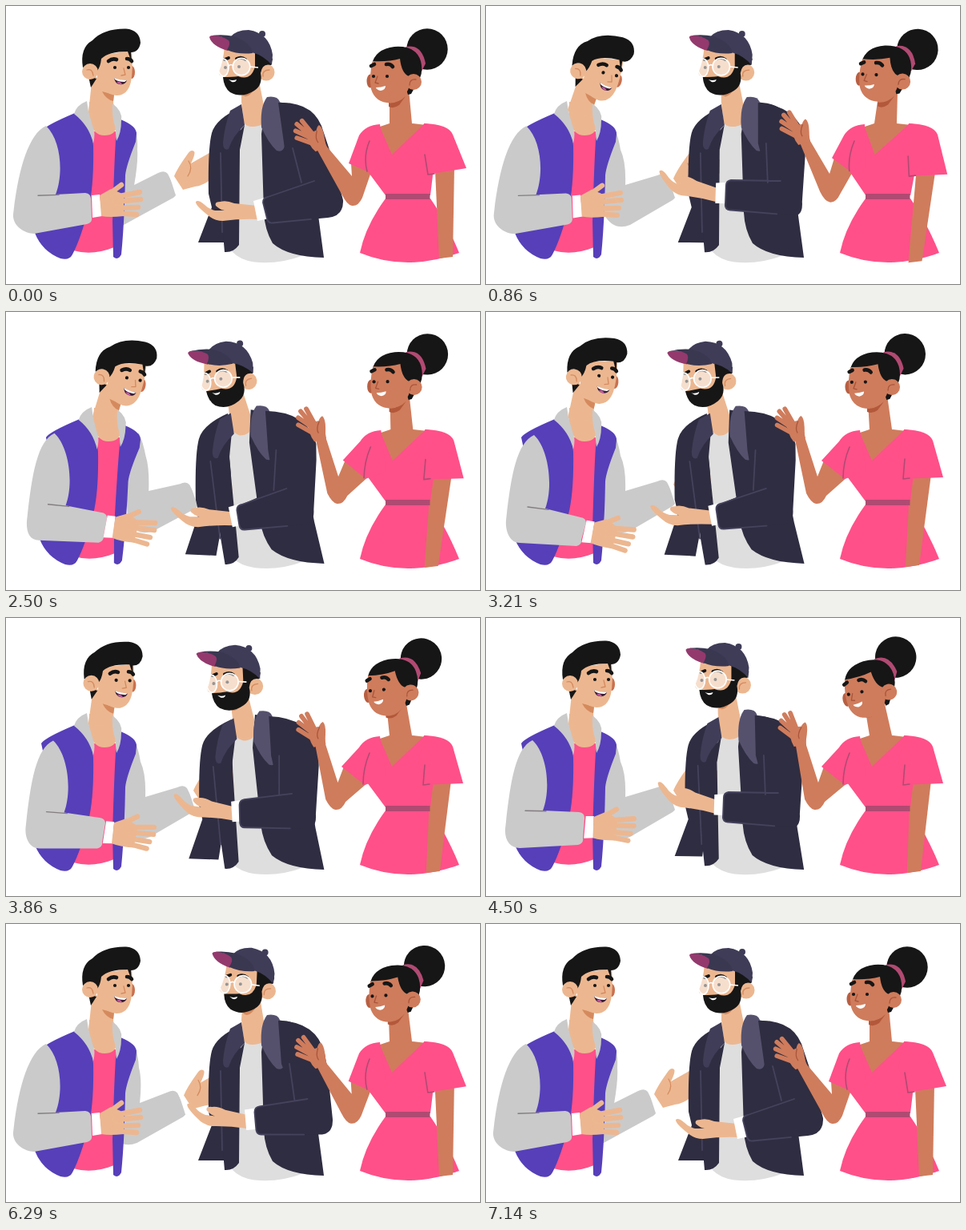
Write an HTML page that moves like this. It is 592 px wide and 348 px high and loops after 7210 ms.

```html
<!DOCTYPE html>
<html lang="en">
<head>
<meta charset="utf-8">
<title>Three friends</title>
<style>
html, body { margin: 0; width: 100%; height: 100%; overflow: hidden; background: #fff; }
svg { display: block; width: 100%; height: 100%; }
.grey { fill: #cacaca; } .violet { fill: #563fb9; } .pink { fill: #ff5089; }
.skin { fill: #ecb790; } .shade { fill: #d58a5e; } .tan { fill: #cf7c5c; } .tanShade { fill: #b3583a; }
.ink { fill: #161616; } .coat { fill: #2f2d41; } .white { fill: #fff; }
.line { fill: none; stroke-width: 1.3; stroke-linecap: round; stroke-linejoin: round; }
.brow { fill: none; stroke: #161616; stroke-width: 4.6; stroke-linecap: round; }
.finger { fill: none; stroke-linecap: round; stroke-linejoin: round; stroke-width: 6.4; }
.sk { stroke: #ecb790; } .sh { stroke: #d58a5e; } .tn { stroke: #cf7c5c; } .ts { stroke: #a9553b; }
.seam { stroke: #45425d; stroke-width: 1.8; } .rose { stroke: #b14a72; stroke-width: 1.6; }
</style>
</head>
<body>
<svg viewBox="0 0 592 348">
  <!-- left man -->
  <path id="farArm" class="grey"/>
  <g id="farHand">
    <path class="white" d="M202,206 L211,204 L222,230 L212,237z"/>
    <path class="skin" d="M210,213 Q214,203 227,185 Q231,179 235,182 Q237,185 231,197 L254,184 L270,190 L268,206 Q250,225 236,226 L221,230z"/>
    <path class="line sh" d="M228,194 Q234,203 227,213"/>
  </g>
  <g id="torso1">
    <path class="pink" d="M107,157 L139,157 L135,302 Q108,313 84,306 L100,250z"/>
    <path class="skin" d="M104,120 L103,140 Q108,162 123,162 Q137,162 138,150 L134,120z"/>
    <path class="violet" d="M143,142 Q163,150 163,160 L162,170 Q150,200 149,212 Q148,270 144,311 Q140,319 134,314 L133,270 Q135,200 137,168z"/>
  </g>
  <path id="panel1" class="violet" d="M44,157 Q48,150 86,134 Q108,152 109,175 Q110,225 103,253 Q94,290 83,311 Q79,319 68,316 Q45,307 36,284 L60,230z"/>
  <g id="head1">
    <path class="skin" d="M108,85 L103,134 L133,134 L135,108z"/>
    <path class="shade" d="M120,107 L135,111 L134,119 Q125,117 120,107z"/>
    <ellipse cx="157" cy="83" rx="4" ry="8" fill="#c9714f"/>
    <path class="ink" d="M103,88 L113,91 L106,102z"/>
    <path class="skin" d="M113,62 L157,56 Q159,80 156,95 Q152,112 138,112 Q120,110 114,92z"/>
    <path class="ink" d="M96,77 Q92,52 108,43 Q122,28 150,28.500 Q167,30 168,46 Q166,58 156,58 L157,71 Q155,65 152,57 Q128,57 119,66 Q118,76 114,81 L104,74z"/>
    <circle class="skin" cx="105" cy="82" r="10"/>
    <path class="line sh" d="M101,80 Q108,78 109,87"/>
    <path class="brow" d="M128,69 Q133,65 138,67 M151,66 Q155,66 157,69"/>
    <circle class="ink" cx="136" cy="77" r="2.100"/><circle class="ink" cx="153" cy="77" r="2.100"/>
    <path class="line sh" d="M147,78 L149,86 L144,87"/>
    <path fill="#351c33" d="M135,90 Q142,94 151,93 Q149,99 142,98 Q136,97 135,90z"/>
    <path class="white" d="M135,90 Q142,93 151,93 L148,95 Q140,95 136,92z"/>
    <path fill="#c659a4" d="M138,95 Q143,94 145,98 Q141,99 138,95z"/>
  </g>
  <g id="collar1" class="grey">
    <path d="M101,119 Q88,124 85,135 Q104,150 109,172 Q112,160 109,153 L103,132z"/>
    <path d="M133,122 Q146,132 144,143 Q144,159 138,169 L136,150 Q132,138 133,122z"/>
  </g>
  <path id="sleeve1" class="grey"/>
  <path id="fold1" class="line" stroke="#827d80"/>
  <g id="hand1">
    <path class="white" d="M-10,-13 L0,-14 L3,13 L-9,15z"/>
    <path class="skin" d="M0,-13 L14,-21 L26,-16 L30,-13 L30,13 Q12,15 2,13z"/>
    <path class="finger sk" d="M7,-11 L27,-26 M20,-11 L50,-17 M20,-5 L51,-8 M20,3 L48,2 M18,9 L46,11"/>
  </g>

  <!-- man with cap -->
  <path id="back2" class="coat"/>
  <path id="shirt2" fill="#dedede" d="M293,146 L324,146 L324,270 Q340,302 372,312 Q340,324 310,320.500 Q292,318 282,307 L290,296z"/>
  <path id="neck2" class="skin"/>
  <path id="chin2" class="shade" d="M294,110 Q301,120 313,100z"/>
  <g id="coat2">
    <path class="coat" d="M325,118 L345,121 Q372,123 380,145 L390,262 L397,315 Q352,314 333,297 Q323,280 322,258 L319,160z"/>
    <path id="front2" class="coat"/>
    <path class="line seam" d="M268,184 L270,283"/>
  </g>
  <g id="lapels2">
    <path fill="#403d58" d="M294,123 L298,149 Q283,163 278,179 Q271,182 271,171 Q273,150 280,131z"/>
    <path fill="#55516d" d="M326,114 Q339,112 342,120 L348,175 Q346,184 338,181 Q328,172 319,152 Q317,126 326,114z"/>
  </g>
  <g id="head2">
    <circle class="skin" cx="325" cy="83" r="10.500"/>
    <path class="line sh" d="M321,88 Q320,80 329,80"/>
    <path class="skin" d="M273,50 L315,56 L314,95 L272,94 L271,88 Q265,88 266,82 Q271,72 273,50z"/>
    <path class="ink" d="M311,57 L333,66 L331,74 Q320,71 318,84 Q321,99 310,106 Q294,116 280,108 Q272,102 271,89 Q283,89 290,88 Q306,94 311,76z"/>
    <path class="white" d="M278,92 Q283,94 288,92 Q287,96 282,95z"/>
    <path class="brow" style="stroke-width:3.800" d="M273,67 L278,65 M288,66 Q294,63 299,67"/>
    <circle class="ink" cx="274" cy="77" r="2"/><circle class="ink" cx="291" cy="76" r="2"/>
    <g fill="#fff" fill-opacity=".55" stroke="#fff" stroke-width="1.600">
      <ellipse cx="271.500" cy="77" rx="6.500" ry="11"/><circle cx="294" cy="76" r="10.800"/>
      <path fill="none" d="M278,75 Q281,72 284,75 M305,76 L315,77"/>
    </g>
    <path fill="#93396d" d="M254,39 Q255,36 264,37 L285,42 L277,56 Q257,50 254,39z"/>
    <circle fill="#3f3c58" cx="320" cy="35" r="4"/>
    <path fill="#3f3c58" d="M280,39 Q287,30 303,30 Q329,34 333,61 L332,74 Q322,62 307,58 L290,50z"/>
    <path fill="#3a3751" d="M258,37 Q270,35 285,38 Q306,46 308,59 Q290,61 276,55 Q281,47 278,43 Q270,37 258,37z"/>
  </g>
  <g id="hand2">
    <path class="skin" d="M0,-8 L-28,-11 Q-38,-15 -45,-13 Q-53,-13 -51,-8 Q-46,-3 -40,-2 L-52,-2 Q-60,-4 -66,-10 Q-73,-16 -76,-13 Q-77,-9 -62,3 Q-53,11 -42,11 Q-20,8 2,9z"/>
    <path class="white" d="M-4,-14 L10,-18 L16,8 L1,11z"/>
  </g>
  <path id="sleeve2" class="coat"/>
  <path id="seam2" class="line seam"/>

  <!-- woman -->
  <path id="arm3" class="tan"/>
  <g id="hand3">
    <path class="tan" d="M-8,3 Q-16,-7 -15,-20 L-3,-23 Q5,-15 7,-1z"/>
    <path class="finger tn" style="stroke-width:5.800" d="M-12,-9 L-28,-18 M-11,-15 L-28,-27 M-10,-17 L-25,-35 M-7,-18 L-18,-38"/>
    <path class="tan" d="M-6,-10 Q-3,-27 2,-29 Q6,-26 6,-14 L6,-4z"/>
    <path class="line ts" d="M-3,-8 Q-6,-13 -2,-22"/>
  </g>
  <path class="pink" d="M474,241 Q449,275 442,309 Q500,333 566,309 Q550,270 530,241z"/>
  <path id="rest3" class="tan"/>
  <path id="neck3" class="tan"/>
  <path id="chin3" class="tanShade" d="M478,121 Q490,122 499,113 L491,124 Q484,129 478,126z"/>
  <path id="dress3" class="pink" d="M466,149 L482,186 L523,147 L540,150 L533,212 L530,237 L474,237 L451,206 L450,160z"/>
  <path id="capL3" class="pink"/><path id="capR3" class="pink"/>
  <path id="lines3" class="line rose"/>
  <rect x="474" y="235" width="55.500" height="7" fill="#b14a72"/>
  <g id="head3">
    <circle class="ink" cx="526" cy="54" r="25.700"/>
    <path fill="#b14a72" d="M499,51 Q519,47 524,72 L519,82 L508,68z"/>
    <ellipse cx="455" cy="94" rx="4.500" ry="8.500" fill="#b85f42"/>
    <path class="ink" d="M457,73 Q461,54 485,51 Q512,49 518,69 Q521,81 517,90 L506,110 L502,111 L497,95z"/>
    <path class="tan" d="M458,69 Q477,70 492,66 Q494,84 503,88 Q506,100 500,109 Q492,121 480,121.500 Q461,121 456,104 Q453,87 458,69z"/>
    <circle class="tan" cx="509" cy="95" r="10"/>
    <path class="line ts" d="M504,99 Q504,91 512,92"/>
    <path class="brow" d="M456,75 L460,73 M475,73 Q480,72 483,76"/>
    <circle class="ink" cx="459" cy="88" r="2.100"/><circle class="ink" cx="476" cy="88" r="2.100"/>
    <path class="line ts" d="M464,88 L461,96 L465,97"/>
    <path class="white" d="M462,102 Q468,102 474,100 Q474,105 468,106 Q463,105 462,102z"/>
  </g>
</svg>
<script>
const LOOP = 7210, STEP = LOOP / 101;

// Eased rise from a to b, hold, then eased fall from c to d (all in ms).
const ramp = (t, a, b) => {
  const u = Math.min(1, Math.max(0, (t - a) / (b - a)));
  return u * u * (3 - 2 * u);
};
const swell = (t, a, b, c, d) => ramp(t, a, b) - ramp(t, c, d);

// A rest value plus one weighted offset per gesture.
const blend = weights => (rest, ...offsets) =>
  rest.map((v, i) => offsets.reduce((sum, o, k) => sum + o[i] * weights[k], v));

const el = id => document.getElementById(id);
const draw = (id, d) => el(id).setAttribute('d', d);
const move = (id, transform) => el(id).setAttribute('transform', transform);
const at = ([x, y], dx = 0, dy = 0) => (x + dx).toFixed(2) + ',' + (y + dy).toFixed(2);
const mix = (a, b, u) => [a[0] + (b[0] - a[0]) * u, a[1] + (b[1] - a[1]) * u];
const place = ([x, y, r], pivot = '') => `translate(${x} ${y}) rotate(${r} ${pivot})`;
const shear = (k, base, squash = 0) => `matrix(1 0 ${-k} ${1 - squash} ${k * base} ${squash * base})`;

function drawLeftMan(t, extend) {
  const reach = swell(t, 700, 1860, 4500, 5700);
  const sway = swell(t, 860, 1860, 1860, 3210);
  const low = swell(t, 1860, 3210, 3210, 4500);
  const nod = swell(t, 0, 860, 1860, 4500);
  const lean = 11 * sway, back = 1 - extend;

  const ex = 8 * sway - 33 * back, r = [6 * sway - 24 * back, 6 * sway - 3 * back];
  draw('farArm', `M145,150 L${at([160 + lean, 152])} Q${at([165 + lean, 162])} ${at([168 + lean + ex * .12, 180])}
    Q${at([175 + ex * .3 + lean * .5, 195])} ${at([174 + ex * .42 + lean * .4, 224])} L${at([214, 212], ...r)}
    Q${at([222, 208], ...r)} ${at([226, 213], ...r)} L${at([236, 233], ...r)} Q${at([239, 239], ...r)} ${at([233, 243], ...r)}
    L${at([180 + ex, 274])} Q${at([160 + ex, 282])} ${at([148 + ex, 262])}z`);
  move('farHand', `translate(${r[0] + 24} ${r[1] + 3})`);

  const tilt = shear(lean / 220, 345);
  move('torso1', tilt);
  move('collar1', tilt);
  move('panel1', `translate(${lean} 0)`);
  move('head1', place([lean, 2 * nod, 13 * nod], '122 125'));

  const pose = blend([reach, sway, low]);
  const top = pose([50, 150], [8, 3], [3, -3], [2, 1]);
  const left = pose([9, 261], [15, 3], [3, -3], [1, -3]);
  const base = pose([35, 285], [7, 3], [-2, -5], [0, 1]);
  const cuffT = pose([105, 235], [17, 9], [4, 3], [2, 14]);
  const cuffB = pose([107, 271], [14, 11], [3, 1], [-2, 9]);
  const bend = pose([62, 236], [9, 5], [4, -2], [3, 5]);
  draw('sleeve1', `M${at(top)} C${at(top, -22, 10)} ${at(left, 6, -55)} ${at(left)}
    C${at(left, -1, 14)} ${at(base, -12)} ${at(base)} L${at(cuffB, -6, 2)} Q${at(cuffB, 1)} ${at(cuffB, 0, -6)}
    L${at(cuffT, 1, 6)} Q${at(cuffT, 1)} ${at(cuffT, -6, -1)} L${at(bend)} C${at(bend, 10, -26)} ${at(top, 19, 18)} ${at(top)}z`);
  const drop = (cuffT[1] - bend[1]) / 4;
  draw('fold1', `M${at(bend, -22, 1 - drop)} L${at(bend, 4, .5 + drop * .3)}`);
  move('hand1', place(pose([117, 250, 0], [16, 12, 7], [2, 2, 4], [-1, 14, 8])));
}

function drawCapMan(t, extend) {
  const bow = swell(t, 700, 2950, 2950, 5220);
  const dip = swell(t, 860, 1860, 3000, 4500);
  const lift = swell(t, 4500, 5430, 5430, 7140);
  const lean = -18 * bow;

  const tilt = shear(lean / 160, 310, 4 * bow / 160);
  move('shirt2', tilt);
  move('coat2', tilt);
  move('lapels2', `translate(${lean * .82} ${bow * 4})`);
  const hem = 296 + 8 * bow, tail = 308 + 9 * bow;
  draw('back2', `M${at([293 + lean, 127])} Q${at([262 + lean, 141])} ${at([257 + lean, 159])} Q${at([252 + lean, 178])} ${at([253 + lean, 235])}
    L${at([257 + lean, 252])} L${at([240 + lean, hem])} L${at([273 + lean * .65, hem + 2 * bow])} L285,180 L${at([298 + lean, 150])}z`);
  draw('front2', `M298,149 L269,185 L271,285 L273,${tail} Q284,${tail + 1} 291,${tail - 9} L292,180z`);

  const pose = blend([bow, dip, lift]);
  const head = pose([0, 0, 0], [-19, 4, 0], [-5, 0, -7], [3, 1.5, 5]);
  const [hx, hy] = head, neckY = 151 + 4 * bow;
  draw('neck2', `M${at([294 + hx, 98])} L${at([316 + hx, 94])} L${at([325 + lean, 140])}
    Q${at([322 + lean, neckY])} ${at([308 + lean, neckY])} Q${at([299 + lean, 151])} ${at([297 + lean, 145])} L${at([294 + lean, 120])}z`);
  move('chin2', `translate(${hx} ${hy})`);
  move('head2', place(head, '325 83'));

  const arm = blend([extend, dip, bow]);
  const shift = [-13, 0];
  const side = arm([397, 159], [2, 6], [0, 0], shift);
  const elbow = arm([421, 243], [-26, 2], [1, 2], shift);
  const under = arm([402, 265], [-14, -3], [-2, 4], shift);
  const cuffB = arm([327, 272], [-27, -16], [4, 17], shift);
  const cuffT = arm([321, 240], [-21, -21], [0, 23], shift);
  const fold = arm([385, 219], [-17, 0], [-6, 2], shift);
  const crease = arm([358, 178], [-8, -6], [-1, 1], shift);
  move('hand2', place(arm([313, 258, 0], [-25, -22, 13], [1, 24, -13], [-8, -2, 0])));
  const cuff = `${at(cuffB, 6, -.5)} Q${at(cuffB)} ${at(cuffB, -1, -6)} L${at(cuffT, 0, 6)} Q${at(cuffT)} ${at(cuffT, 6, -1)}`;
  draw('sleeve2', `M${at([340 + lean, 121 + 3 * bow])} Q${at(side, -10, -40)} ${at(side)}
    L${at(mix(side, elbow, .25), 1)} L${at(elbow)} Q${at([elbow[0] + 1, under[1] - 2])} ${at(under)} L${cuff}
    L${at(fold, -15, 2)} L${at(crease, -10)}z`);
  draw('seam2', `M${at(mix(cuffB, under, .72))} L${cuff} L${at(fold)} M${at(crease)} L${at(fold, -16, 2)}`);
}

function drawWoman(t) {
  const raise = swell(t, 0, 1860, 4500, 6500);
  const sway = swell(t, 0, 860, 860, 3210);
  const tilt = swell(t, 3210, 4700, 4700, 7140);
  const lean = 6 * sway, pose = blend([raise, sway, tilt]);

  const tipL = pose([428, 197], [-9, -11], [8, -2], [0, 0]);
  const pitL = pose([453, 208], [-5, 1], [5, -1], [0, 0]);
  const tipR = pose([575, 203], [-4, 4], [3, 6], [0, 0]);
  const pitR = pose([527, 211], [-6, -2], [4, 3], [0, 0]);
  const wrist = pose([394, 178, -10], [-2, -19, 9], [5, 1, 4], [1, 0, 9]);
  const inner = pose([432, 213], [-18, -7], [5, 0], [1, 0]);
  const elbow = pose([434, 249], [-20, -10], [6, 0], [-2, 0]);
  const rest = pose([550, 315], [-17, 3], [-6, 4], [2, 0]);
  const head = pose([0, 0, 0], [-2, -1, -1], [12, 0, 3], [-4, -1.5, -11]);
  const [hx, hy] = head;

  draw('arm3', `M${at(wrist, -6, 1)} L${at(wrist, 6, -3)} L${at(inner)} L${at(tipL, 3)} L${at(pitL, 4, -3)}
    L${at(elbow, 11, -9)} Q${at(elbow, 6, 2)} ${at(elbow, -2, 1)} Q${at(elbow, -8)} ${at(elbow, -14, -12)}z`);
  move('hand3', place(wrist));
  draw('rest3', `M${at(pitR, 9, -5)} L${at(tipR, -15, -4)} L${at(rest, 8, -1)} L${at(rest, -9, 1)}z`);
  draw('neck3', `M${at([479 + hx, 112])} L${at([503 + hx, 104])} L${at([507 + lean, 147])} L${at([525 + lean, 149])}
    L${at([483 + lean * .6, 192])} L${at([464 + lean, 152])} L${at([479 + lean, 147])}z`);
  move('chin3', `translate(${hx} ${hy})`);
  move('dress3', shear(lean / 90, 240));
  draw('capL3', `M${at([467 + lean, 148])} Q${at([449 + lean, 149])} ${at([441 + lean, 162])} L${at(tipL)} L${at(pitL)} L475,200z`);
  draw('capR3', `M${at([522 + lean, 147])} Q${at([553 + lean, 148])} ${at([558 + lean, 161])} L${at(tipR)} L${at(pitR)} L515,180z`);
  draw('lines3', `M${at([454 + lean, 169])} Q${at([446 + lean, 188])} ${at(pitL, -2, -1)}
    M${at([523 + lean * .7, pitR[1] - 25])} L${at(pitR)} L${at(pitR, 8, -1)}`);
  move('head3', place(head, '509 95'));
}

function render(now) {
  const t = Math.floor((now % LOOP) / STEP + .08) * STEP;
  const extend = swell(t, 0, 860, 5430, 7140);
  drawLeftMan(t, extend);
  drawCapMan(t, extend);
  drawWoman(t);
}

const start = performance.now();
function tick() {
  render(performance.now() - start);
  requestAnimationFrame(tick);
}
tick();
</script>
</body>
</html>
```
